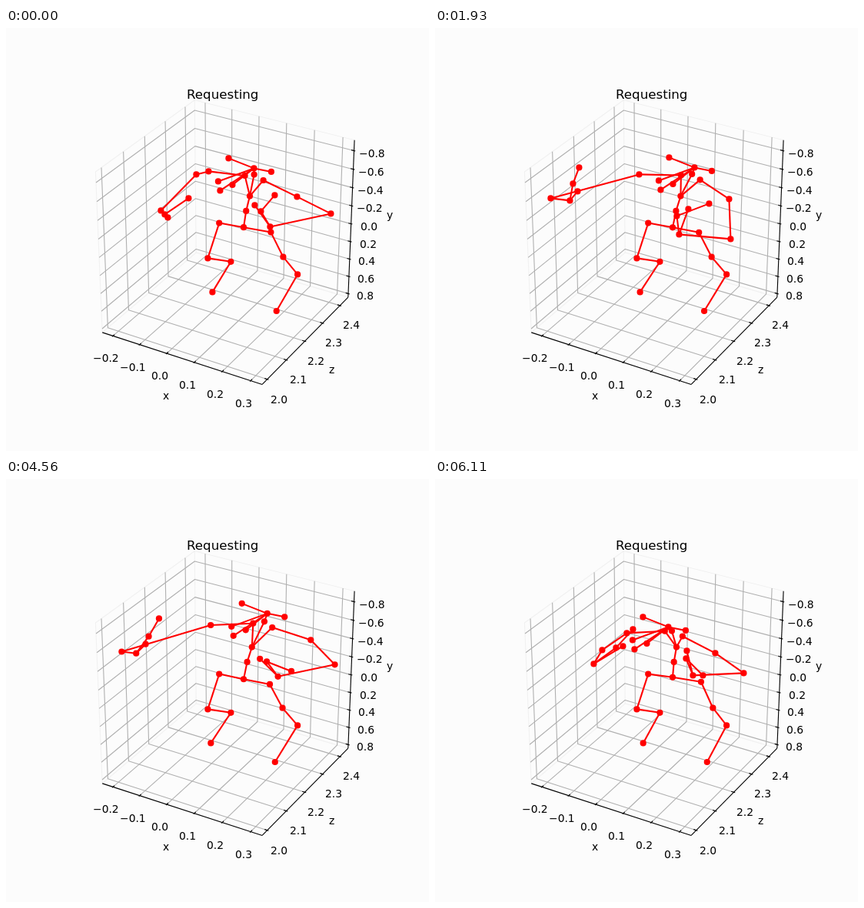
Recreate the animation shown at these times as an HTML page with a canvas. Size 550 px wide and 550 px high, loop 6.14 s.

```html
<!DOCTYPE html>
<html lang="en">
<head>
<meta charset="utf-8">
<title>Requesting</title>
<style>
  html, body { margin: 0; width: 100%; height: 100%; overflow: hidden; background: #fcfcfc; }
  canvas { display: block; }
</style>
</head>
<body>
<canvas id="stage" width="550" height="550"></canvas>
<script>
const ctx = document.getElementById('stage').getContext('2d');
const LOOP = 6140;
const WALL = 0.5208;    // half size of the plot box
const LABEL = 0.5963;   // distance of the tick labels from its centre

// Perspective view of the plot box: elevation 30°, azimuth -60°
function project([x, y, z]) {
  const depth = 10 - (0.433 * x - 0.75 * y + 0.5 * z);
  return [
    287.6 + 2304 * (0.866 * x + 0.5 * y) / depth,
    272 - 2289 * (-0.25 * x + 0.433 * y + 0.866 * z) / depth
  ];
}

function stroke(points, color, width) {
  ctx.beginPath();
  points.forEach(p => ctx.lineTo(...p));
  ctx.strokeStyle = color;
  ctx.lineWidth = width;
  ctx.stroke();
}

const line3d = (color, ...points) => stroke(points.map(project), color, 1.11);

// Centred text on whole pixels
function text(str, x, y, size = 13.89) {
  ctx.font = size + 'px "DejaVu Sans", sans-serif';
  ctx.fillText(str, Math.round(x - ctx.measureText(str).width / 2), Math.floor(y));
}

const W = WALL, L = LABEL;
const axes = [
  { from: -0.2, step: 0.1, count: 6, place: v => (v - 0.05) * 1.795,
    grid: v => [[v, -W, -W], [v, W, -W], [v, W, W]],
    edge: v => [v, -W, -W], out: [0, -1, 0], label: v => [v, -L, -L] },
  { from: 2, step: 0.1, count: 5, place: v => (v - 2.2) * 2.196 - 0.0244,
    grid: v => [[W, v, -W], [-W, v, -W], [-W, v, W]],
    edge: v => [W, v, -W], out: [1, 0, 0], label: v => [L, v, -L] },
  { from: -0.8, step: 0.2, count: 9, place: v => -0.0207 - 0.5934 * v,
    grid: v => [[-W, -W, v], [-W, W, v], [W, W, v]],
    edge: v => [W, W, v], out: [1, 0, 0], label: v => [L, L, v] }
];

function drawPlot() {
  ctx.fillStyle = '#fcfcfc';
  ctx.fillRect(0, 0, 550, 550);
  ctx.fillStyle = '#000';
  ctx.lineJoin = 'round';

  line3d('#f1f1f1', [-W, -W, -W], [-W, -W, W], [-W, W, W], [W, W, W]);
  line3d('#f1f1f1', [-W, -W, -W], [-W, W, -W], [W, W, -W]);
  line3d('#f1f1f1', [-W, W, -W], [-W, W, W]);

  const ticks = axis => Array.from({ length: axis.count }, (_, i) => axis.from + i * axis.step);
  for (const axis of axes)
    for (const v of ticks(axis)) line3d('#b0b0b0', ...axis.grid(axis.place(v)));

  for (const axis of axes) {
    line3d('#000', axis.edge(-W), axis.edge(W));
    for (const v of ticks(axis)) {
      const at = axis.place(v), edge = axis.edge(at);
      const shift = d => edge.map((c, i) => c + d * axis.out[i]);
      line3d('#000', shift(-0.0167), shift(0.0083));
      const [x, y] = project(axis.label(at));
      text((v < -0.01 ? '\u2212' : '') + Math.abs(v).toFixed(1), x, y + 11.6);
    }
  }
  text('x', 208, 483);
  text('z', 423.5, 449);
  text('y', 499, 248);
  text('Requesting', 281.9, 92, 16.67);
}

// Poses: 0 arms gathered, 1 left arm raised, 2 both arms open, 3 folded
const timeline = [
  [0, 0], [600, 0.12], [1260, 1], [2390, 1], [2690, 1.35], [3080, 1.35], [3140, 1.65],
  [4530, 1.6], [4560, 1.77], [5210, 1.77], [5360, 2], [5840, 2.85], [6110, 3], [LOOP, 3]
];

function poseAt(t) {
  const i = timeline.findIndex(([time]) => time > t);
  const [t0, a] = timeline[i - 1], [t1, b] = timeline[i];
  return a + (b - a) * (t - t0) / (t1 - t0);
}

function between(keys, pose) {
  const i = Math.min(Math.floor(pose), keys.length - 2);
  return keys[i].map((c, k) => c + (keys[i + 1][k] - c) * (pose - i));
}

const joints = [];
const joint = (parent, at) => joints.push({ parent, at }) - 1;

// Joint moving through one point per pose
const keyed = (parent, ...keys) => joint(parent, pose => between(keys, pose));

// Joint at an offset from its parent, fixed or one per pose
const bone = (parent, ...offsets) => joint(parent, pose => {
  const [dx, dy] = offsets.length > 1 ? between(offsets, pose) : offsets[0];
  const [x, y] = joints[parent].at(pose);
  return [x + dx, y + dy];
});

// Joint that takes a share of the head's movement
const headKeys = [[322, 182], [337, 181], [340, 172.5], [303, 192]];
const leaning = (parent, x, y, kx = 0, ky = 0) => joint(parent, pose => {
  const [hx, hy] = between(headKeys, pose);
  return [x + kx * (hx - 322), y + ky * (hy - 182)];
});

const pelvis = leaning(-1, 308.6, 258.8, 0, -0.14);
const hipL = leaning(pelvis, 276.8, 253.2);
const kneeL = leaning(hipL, 262, 299);
const ankleL = leaning(kneeL, 292, 303.4);
leaning(ankleL, 268, 343, -0.12);
const hipR = leaning(pelvis, 344, 265.2, -0.08, -0.18);
const kneeR = leaning(hipR, 360, 297.3, -0.05);
const ankleR = leaning(kneeR, 378.7, 320);
leaning(ankleR, 351.3, 367.6, -0.11);

const navel = leaning(pelvis, 311.8, 237.5, 0.08);
const chest = leaning(navel, 316.6, 218.2, 0.16);
const neck = leaning(chest, 322.2, 190.2, 0.77, 0.7);
const head = leaning(neck, 322, 182, 1, 1);
for (const offset of [[-33, -13], [22.5, 4.5], [-46.5, 17], [-44, 29], [-28, 21.5]])
  bone(head, offset);

const collarL = leaning(chest, 310.2, 191.6, 0.62, 0.57);
const shoulderL = keyed(collarL, [263, 186], [265, 190], [266, 189.5], [249, 200]);
const elbowL = keyed(shoulderL, [247, 190], [150, 221], [150, 225], [217, 222]);
const wristL = keyed(elbowL, [201, 237], [175, 224], [167, 227], [206, 240]);
const handL = bone(wristL, [5, 5], [4, -22], [20, -22], [29, -21]);
bone(handL, [31, -21], [8, -21], [15, -24], [22, -24]);
bone(wristL, [9, 9], [10, -12], [13, -12], [38, -23]);

const collarR = leaning(chest, 334.2, 197.6, 0.67, 0.65);
const shoulderR = keyed(collarR, [378, 219], [382, 222], [400, 205], [364, 226]);
const elbowR = keyed(shoulderR, [422, 241], [384, 274], [440, 231], [401, 252]);
const wristR = keyed(elbowR, [343, 258], [317, 268], [364, 253], [335, 255]);
const handR = bone(wristR, [-12, -20], [-3, -24], [-18, -18], [-9, -22]);
bone(handR, [18, -21], [42, -16], [29, 21], [22, 22]);
bone(wristR, [-20, -28], [12, -33], [-34, -20], [-8, -32]);

function drawFigure(pose) {
  const points = joints.map(j => j.at(pose).map(c => c + 0.4));
  joints.forEach((j, i) => {
    if (j.parent >= 0) stroke([points[j.parent], points[i]], '#f00', 2.08);
  });
  ctx.fillStyle = '#f00';
  for (const [x, y] of points) {
    ctx.beginPath();
    ctx.arc(x, y, 4.1, 0, 2 * Math.PI);
    ctx.fill();
  }
}

let start;
function frame(now) {
  start ??= now;
  drawPlot();
  drawFigure(poseAt((now - start) % LOOP));
  requestAnimationFrame(frame);
}
requestAnimationFrame(frame);
</script>
</body>
</html>
```
